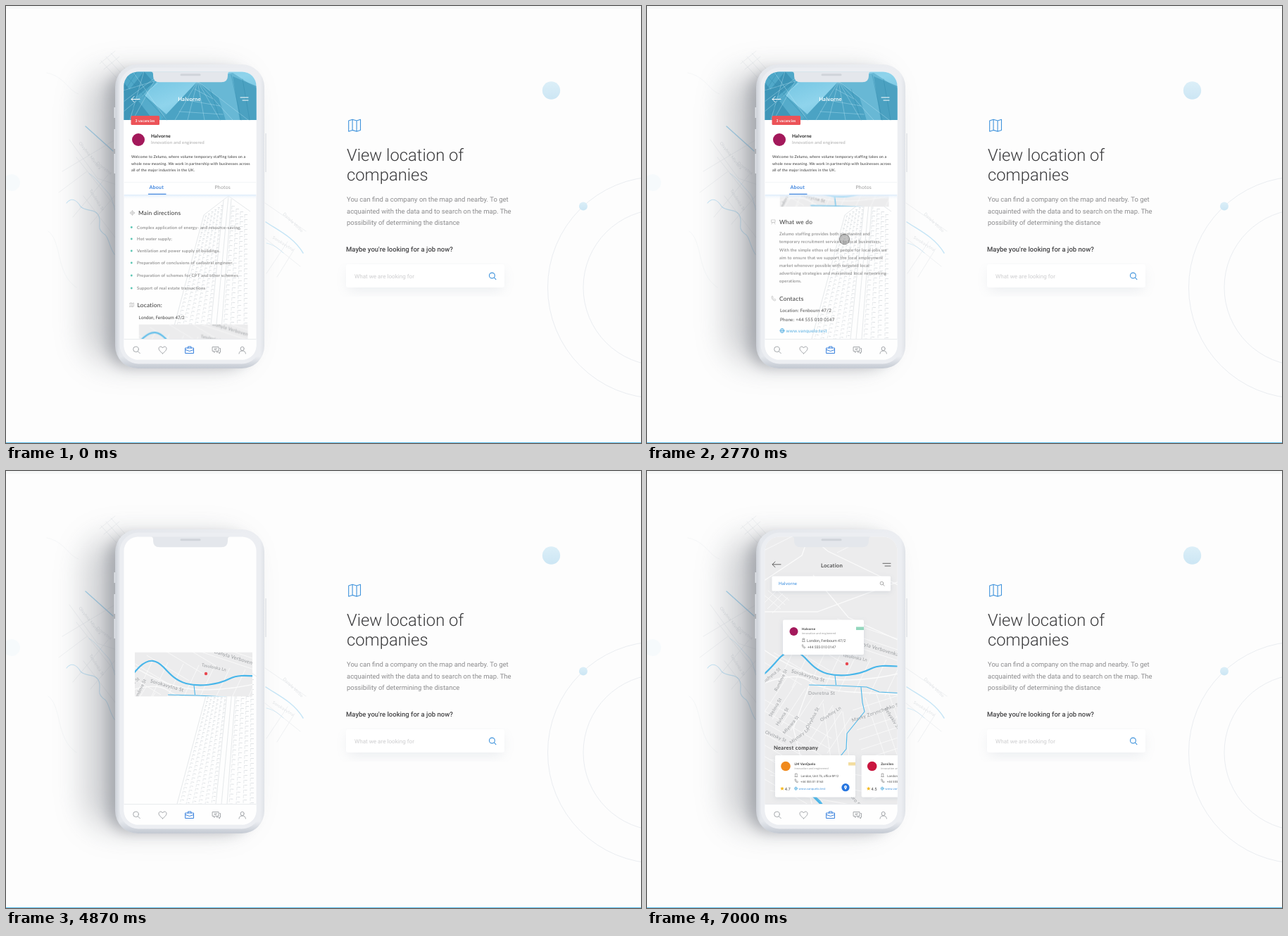
An HTML page that plays this animation: 902 by 621 pixels, repeating every 7060 ms.

```html
<!DOCTYPE html>
<html lang="en">
<head>
<meta charset="utf-8">
<title>View location of companies</title>
<style>
html, body { margin: 0; width: 100%; height: 100%; overflow: hidden; background: #fdfdfd; }
svg, #zoom { position: absolute; left: 0; top: 0; width: 902px; height: 621px; }
text { font-family: Lato, "Open Sans", sans-serif; letter-spacing: .03em; text-rendering: geometricPrecision; }
.r { font-family: Roboto, "Open Sans", sans-serif; letter-spacing: 0; }
.b { font-weight: 700; }
.h { font-size: 8.35px; fill: #333; }
.p { font-size: 6.05px; fill: #777; }
.s { font-size: 6.3px; fill: #444; }
.mini { font-size: 3.9px; fill: #999; }
.line { fill: none; stroke-linecap: round; stroke-linejoin: round; }
.road { fill: none; stroke: #fbfbfb; }
.water { fill: none; stroke: #48b6ea; stroke-linejoin: round; }

#scroll, #mini, #page, #tower, #zoom, #map2, #bar, #tip, #near, #cards, #dot {
  animation: 7060ms linear infinite both;
}
#scroll { animation-name: scroll; }
#mini { animation-name: mini; }
#page { animation-name: page; }
#tower { animation-name: tower; }
#zoom { animation-name: zoom; }
#map2 { animation-name: map2; }
#bar { animation-name: bar; }
#tip { animation-name: tip; }
#near { animation-name: near; }
#cards { animation-name: cards; }
#dot { animation-name: dot; }

@keyframes scroll {
  0%, 32% { transform: translateY(0); animation-timing-function: cubic-bezier(.45,0,.25,1); }
  44.9%, 48% { transform: translateY(-277px); animation-timing-function: cubic-bezier(.45,0,.25,1); }
  57.5%, 100% { transform: translateY(-140.5px); }
}
@keyframes mini { 0%, 62.32% { opacity: 1; } 62.33%, 100% { opacity: 0; } }
@keyframes page {
  0%, 62.2% { opacity: 1; animation-timing-function: ease-in-out; }
  67%, 100% { opacity: 0; }
}
@keyframes tower {
  0%, 62.2% { transform: translateX(-9px); animation-timing-function: ease-in-out; }
  68.9%, 100% { transform: none; }
}
@keyframes zoom {
  0%, 62.31% { visibility: hidden; clip-path: inset(312.5px 558.5px 251px 188.5px round 0px 0px 0px 0px); }
  62.32% { visibility: visible; clip-path: inset(312.5px 558.5px 251px 188.5px round 0px 0px 0px 0px); animation-timing-function: ease-in-out; }
  68.9% { visibility: visible; clip-path: inset(258px 552px 301px 183px round 0px 0px 0px 0px); animation-timing-function: cubic-bezier(.4,0,.2,1); }
  72.8%, 100% { visibility: visible; clip-path: inset(93.5px 546.5px 148px 167.5px round 20px 20px 0px 0px); }
}
@keyframes map2 {
  0%, 62.32% { transform: translate(18.7px,86.1px) scale(.928); animation-timing-function: ease-in-out; }
  68.9% { transform: translate(0,14px) scale(1); animation-timing-function: cubic-bezier(.4,0,.2,1); }
  72.8%, 100% { transform: translate(0,0) scale(1); }
}
@keyframes bar { 0%, 73.1% { opacity: 0; transform: translateY(-5px); animation-timing-function: ease-out; } 77.3%, 100% { opacity: 1; transform: none; } }
@keyframes tip { 0%, 74.4% { opacity: 0; transform: translateY(8px); animation-timing-function: ease-out; } 79%, 100% { opacity: 1; transform: none; } }
@keyframes near { 0%, 73.6% { opacity: 0; animation-timing-function: ease-out; } 78%, 100% { opacity: 1; } }
@keyframes cards {
  0%, 73.1% { transform: translateX(190px); animation-timing-function: cubic-bezier(.25,.5,.4,1); }
  80.3% { transform: translateX(-15.4px); animation-timing-function: cubic-bezier(.35,0,.2,1); }
  99.1%, 100% { transform: none; }
}
@keyframes dot {
  0%, 14% { opacity: 0; transform: translate(330px,272px); animation-timing-function: linear; }
  14.9% { opacity: 1; transform: translate(327px,279px); animation-timing-function: ease-out; }
  19.8%, 22.5% { opacity: 1; transform: translate(284.5px,369.5px); animation-timing-function: ease-in-out; }
  26% { opacity: 1; transform: translate(276px,364px) scale(.9); animation-timing-function: ease-in-out; }
  29.7%, 32.1% { opacity: 1; transform: translate(280.5px,359px) scale(.79); animation-timing-function: cubic-bezier(.45,0,.25,1); }
  44.9%, 48% { opacity: 1; transform: translate(280.5px,325px) scale(.79); animation-timing-function: ease-in-out; }
  57.5%, 62.2% { opacity: 1; transform: translate(281px,337px); animation-timing-function: ease-out; }
  64.8%, 100% { opacity: 0; transform: translate(281px,337px) scale(1.3); }
}
</style>
</head>
<body>

<!-- stage and phone -->
<svg viewBox="0 0 902 621">
  <defs>
    <filter id="blur" x="-50%" y="-30%" width="200%" height="160%"><feGaussianBlur stdDeviation="22"/></filter>
    <filter id="blurS" x="-30%" y="-30%" width="160%" height="160%"><feGaussianBlur stdDeviation="9"/></filter>
    <filter id="drop" x="-20%" y="-40%" width="140%" height="200%"><feDropShadow dx="0" dy="2" stdDeviation="3" flood-color="#8795a8" flood-opacity=".22"/></filter>
    <linearGradient id="ball" x2="0" y2="1"><stop stop-color="#dceff8"/><stop offset="1" stop-color="#cce6f4"/></linearGradient>
    <linearGradient id="body"><stop stop-color="#cdd1d8"/><stop offset=".03" stop-color="#e4e7ec"/><stop offset=".97" stop-color="#eceef2"/><stop offset="1" stop-color="#e0e3e8"/></linearGradient>
    <linearGradient id="foot" x2="0" y2="1"><stop offset=".96" stop-color="#b4bbc6" stop-opacity="0"/><stop offset="1" stop-color="#b4bbc6" stop-opacity=".7"/></linearGradient>
    <linearGradient id="sky" x2="1" y2="1"><stop stop-color="#66bddd"/><stop offset=".5" stop-color="#8fd4ec"/><stop offset="1" stop-color="#5cb5d6"/></linearGradient>
    <linearGradient id="tabs" x2="0" y2="1"><stop stop-color="#dcebfa"/><stop offset="1" stop-color="#fff" stop-opacity="0"/></linearGradient>
    <clipPath id="screen"><rect x="167.5" y="93.5" width="188" height="409" rx="20"/></clipPath>
    <clipPath id="list"><rect x="167.5" y="268" width="188" height="205"/></clipPath>
    <clipPath id="strip"><rect x="183" y="244" width="167" height="62"/></clipPath>
  </defs>
  <rect width="902" height="4" fill="#f6f7f7"/>
  <rect y="620" width="902" height="1" fill="#5fc0ee"/>

  <g class="line" stroke="#eff1f3">
    <path d="M135 78l22 24M142 72l22 24M149 67l20 22M133 82l22-18M139 90l22-18M90 190l40 55l30 10M80 235l75-45M100 215l55 70M75 265l40-30M110 270l46 60M95 300l50-60M120 310l34-40M368 280l58 40M368 330l50 40M370 380l30-45M385 385l25-40"/>
    <path d="M58 95c25 5 30 25 45 30M60 320c20 15 10 60 40 80" stroke="#f5f7f8"/>
  </g>
  <g class="line" stroke="#a9d9f3">
    <path d="M113 171l39 35" stroke-width="1.5"/>
    <g opacity=".65">
      <path d="M86 280c8-10 16-2 20 5c8 8 22 2 26 14c4 10-4 16 6 24c8 4 8 18 16 30" stroke-width="1.1"/>
      <path d="M118 238c10 6 18 18 26 26s8 20 11 26" stroke-width=".7"/>
      <path d="M369 307c18 12 40 22 53 44" stroke-width="1.5"/>
      <path d="M370 337c10 2 18 8 24 14" stroke-width=".7"/>
    </g>
  </g>
  <g fill="#dfe2e5" font-size="6">
    <text transform="translate(103 195) rotate(52)">Olvyhna Mlynara</text>
    <text transform="translate(128 224) rotate(38)">Dovretna</text>
    <text transform="translate(393 296) rotate(44)">Danyla Verbo</text>
    <text transform="translate(378 330) rotate(32)">Sorokavytna</text>
    <text transform="translate(118 262) rotate(58)">Tasulenka St</text>
  </g>

  <circle cx="8" cy="251" r="12" fill="#f6fafc"/>
  <g fill="none" stroke="#eaedf1">
    <circle cx="927" cy="400" r="157.5"/>
    <circle cx="931" cy="400" r="111"/>
  </g>
  <circle cx="774.5" cy="120" r="12.7" fill="url(#ball)"/>
  <circle cx="820" cy="284.5" r="6" fill="url(#ball)"/>

  <path class="line" stroke="#3f93dc" stroke-width="1.1" d="M486.7 163l5.4-1.8l6 1.8l5.4-1.8v15.2l-5.4 1.8l-6-1.8l-5.4 1.8zM492.1 161.2v15.2M498.1 163v15.2"/>
  <g fill="#39393b" font-size="23.8" font-weight="300">
    <text class="r" x="484" y="219.5">View location of</text>
    <text class="r" x="484" y="248.3">companies</text>
  </g>
  <g fill="#8b8b8d" font-size="9.48">
    <text class="r" x="484" y="278.2">You can find a company on the map and nearby. To get</text>
    <text class="r" x="484" y="294.7">acquainted with the data and to search on the map. The</text>
    <text class="r" x="484" y="311.2">possibility of determining the distance</text>
  </g>
  <text class="r" x="483" y="349" font-size="9.5" font-weight="500" fill="#454547">Maybe you're looking for a job now?</text>
  <rect x="486" y="374" width="219" height="30" rx="4" fill="#8795a8" opacity=".16" filter="url(#blurS)"/>
  <rect x="483" y="367" width="225" height="33" rx="3" fill="#fff"/>
  <text class="r" x="495" y="386.5" font-size="8.1" fill="#cdcdcf">What we are looking for</text>
  <path class="line" stroke="#3f93dc" stroke-width="1.1" d="M693.5 386l2.4 2.6M694.3 383a3.9 3.9 0 1 1-7.8 0a3.9 3.9 0 1 1 7.8 0"/>

  <rect x="112" y="94" width="230" height="414" rx="40" fill="#70757d" opacity=".34" filter="url(#blur)"/>
  <rect x="144" y="92" width="205" height="422" rx="32" fill="#666b74" opacity=".36" filter="url(#blurS)"/>
  <path d="M154.3 144v15M154.3 175v28M154.3 210v28" stroke="#dfe2e7" stroke-width="1.6"/>
  <path d="M369 181v55" stroke="#d3d7dd"/>
  <rect x="155" y="83" width="212" height="432" rx="32" fill="url(#body)"/>
  <rect x="155" y="83" width="212" height="432" rx="32" fill="url(#foot)"/>
  <rect x="161.5" y="87.5" width="200" height="421" rx="27" fill="#eceef2"/>
  <rect x="167.5" y="93.5" width="188" height="409" rx="20" fill="#fefefe"/>
  <g clip-path="url(#list)"><g id="tower" fill="none" stroke="#dfe2e5"></g></g>
</svg>

<!-- company page -->
<svg viewBox="0 0 902 621">
  <g id="page">
    <g clip-path="url(#list)">
      <g id="scroll">
        <g class="line" stroke="#bbb" stroke-width=".7">
          <circle cx="179.5" cy="294" r="2.5"/><path d="M179.5 290.6v6.8M176.1 294h6.8"/>
          <path d="M175.5 422.5l2-.6l2 .6l2-.6v5l-2 .6l-2-.6l-2 .6zM177.5 422v5M179.5 422.5v5"/>
          <path d="M177 529h5v3.5h-5zM177 535l1.5-2.5M182 535l-1.5-2.5"/>
          <path d="M177 638.5q0 5 5 5.5l1-1.5l-1.8-1.2l-1 .8q-1.2-.7-1.7-2l.8-.9l-1-1.7z"/>
          <path d="M177 712h4v6h-4zM178.5 714h4M178.5 716h4"/>
        </g>
        <text class="h" x="188" y="297">Main directions</text>
        <g id="items"></g>
        <text class="h" x="186.5" y="428">Location:</text>
        <text class="s r" x="188.5" y="445.2">London, Fenbourn 47/2</text>
        <g id="mini"><g transform="translate(18.7 226.6) scale(.928)"><g clip-path="url(#strip)"><use href="#map"/></g></g></g>
        <text class="h" x="188" y="535">What we do</text>
        <g id="about"></g>
        <text class="h" x="188" y="644.3">Contacts</text>
        <text class="s" x="189" y="660.3">Location: Fenbourn 47/2</text>
        <text class="s" x="189" y="672.7">Phone: +44 555 010 0147</text>
        <g class="line" stroke="#4aa9e0" stroke-width=".7"><circle cx="192" cy="686.5" r="3"/><ellipse cx="192" cy="686.5" rx="1.3" ry="3"/><path d="M189 686.5h6"/></g>
        <text x="197.5" y="688.7" font-size="6.5" fill="#4aa9e0">www.vanquelo.test</text>
        <text class="h" x="188" y="717.7">Other company vacancies</text>
        <rect x="179.5" y="733.8" width="6" height="4.8" rx=".6" fill="#f0a353"/>
        <text x="192.5" y="739" font-size="6.8" fill="#444">Sales Engineer</text>
        <text x="192.5" y="747" font-size="4.7" fill="#4aa9e0">norvetmalenika</text>
        <text class="r" x="336.5" y="738" font-size="6.4" font-weight="500" fill="#3b82dd" text-anchor="end">$18 / hr</text>
        <text x="336.5" y="747" font-size="4.3" fill="#aaa" text-anchor="end">Temporary</text>
      </g>
      <rect x="167.5" y="268" width="188" height="7" fill="url(#tabs)"/>
    </g>

    <g clip-path="url(#screen)">
      <rect x="167" y="162" width="189" height="106" fill="#fff"/>
      <rect x="167" y="93" width="189" height="69" fill="url(#sky)"/>
      <path d="M167 93h42l6 14l-18 20l40 35h-70z" fill="#459fc1" opacity=".75"/>
      <path d="M167 108l42 54h-42zM196 93l14 16l-43 34v-14z" fill="#2f86a9" opacity=".55"/>
      <path d="M272 107l32 22l8 33h-92z" fill="#4ba3c4"/>
      <path d="M272 107l50-12l34 22v45h-44l-10-32z" fill="#68b8d5"/>
      <path d="M322 100l34 14v48h-24z" fill="#3f97b9" opacity=".7"/>
      <path class="line" stroke="#c4ecf8" stroke-width=".6" opacity=".6" d="M272 107l32 55M272 107l10 55M272 107l-14 55M272 107l-32 55M272 107l50 55M272 107l72 55M167 120l66-20M167 136l50-38M180 93l48 69M196 93l-20 69M210 108l-30 54M167 150l48-40M268 118l26 14M258 134l46 8M246 150l62 4"/>
      <path class="line" stroke="#2f86a9" stroke-width=".7" opacity=".6" d="M170 98l58 64M186 93l-19 30M204 112l-28 40M290 118l14 44M320 98l14 64M336 104l10 58"/>
    </g>
    <path class="line" stroke="#fff" d="M190 132.5h-12l4-4M178 132.5l4 4M333 130h11M336 134h8"/>
    <text class="b" x="260.5" y="134.7" font-size="7.6" fill="#fff" text-anchor="middle">Halvorne</text>
    <rect x="177.5" y="156" width="40.5" height="13" rx="1.5" fill="#ec5358"/>
    <text class="b" x="197.5" y="164.5" font-size="5.2" fill="#fff" text-anchor="middle">3 vacancies</text>
    <circle cx="188" cy="190" r="9" fill="#a3195b"/>
    <text class="b" x="206" y="187.3" font-size="6.5" fill="#222">Halvorne</text>
    <text x="206" y="196.3" font-size="6.1" fill="#aaa">Innovation and engineered</text>
    <g font-size="5.35" fill="#333">
      <text x="178" y="216">Welcome to Zelumo, where volume temporary staffing takes on a</text>
      <text x="178" y="225.7">whole new meaning. We work in partnership with businesses across</text>
      <text x="178" y="235.3">all of the major industries in the UK.</text>
    </g>
    <path d="M168 250.5h187" stroke="#f3f5f7"/>
    <text class="b" x="203.5" y="259.7" font-size="7" fill="#3b82dd">About</text>
    <text x="296.5" y="259.7" font-size="6.95" fill="#999">Photos</text>
    <path d="M202 267.3h25.5" stroke="#3b82dd" stroke-width="1.2"/>
  </g>
</svg>

<!-- map that grows to fill the screen -->
<div id="zoom"><svg viewBox="0 0 902 621">
  <g id="map2"><g id="map">
    <rect x="160" y="80" width="205" height="400" fill="#ececed"/>
    <path class="road" id="roads" stroke-width=".8"/>
    <path class="road" stroke-width="1.3" d="M160 250q60 42 105 46t100-10M160 304q50-20 70-6t60 16t76 4M215 80l42 34l108 52M160 160l60-40l14-40M160 200l82 0l124-46M230 306l-22 60l28 114M356 240l-70-32l-50-60"/>
    <path class="water" stroke-width="2.2" d="M160 293C170 288 181 273 190 264C204 251 214 255 224 265C234 276 242 284 256 288C275 293 300 290 318 281C330 275 343 277 365 278"/>
    <path class="water" stroke-width="1.1" d="M267 290.5l1.5 13.5M230 304l42 1l40 2l18 7l36 2M304 307l2 22l3 13l-25 31l-1 22l-16 20l-24 10l-14 14M222 446l14 14l10 9l8 11"/>
    <path class="water" stroke-width="3" d="M232 458l18 18"/>
    <circle cx="284" cy="274" r="2.2" fill="#e8474f"/>
    <g id="streets" fill="#989b9e" text-anchor="middle"></g>
  </g></g>
</svg></div>

<!-- map interface, navigation, touch -->
<svg viewBox="0 0 902 621">
  <g id="bar">
    <path class="line" stroke="#555" stroke-width=".9" d="M190 132.8h-12l4-3.8M178 132.8l4 3.8M335 131.3h11M338 135h8"/>
    <text class="b" x="262.5" y="136.7" font-size="7.7" fill="#555" text-anchor="middle">Location</text>
    <rect x="177.5" y="149.5" width="168.5" height="21" rx="1.5" fill="#fff" filter="url(#drop)"/>
    <text x="187" y="162.2" font-size="6.2" fill="#2d86dc">Halvorne</text>
    <path class="line" stroke="#999" stroke-width=".8" d="M335.3 161.3l1.8 1.9M335.8 159.5a2.3 2.3 0 1 1-4.6 0a2.3 2.3 0 1 1 4.6 0"/>
  </g>
  <g id="tip">
    <rect x="193" y="211.5" width="115" height="49.5" rx="2" fill="#fff" filter="url(#drop)"/>
    <circle cx="208.5" cy="228" r="6" fill="#a3195b"/>
    <rect x="297" y="221.5" width="11" height="4.5" fill="#93d7bd"/>
    <text class="b" x="220" y="226.3" font-size="4.45" fill="#333">Halvorne</text>
    <text class="mini" x="220" y="231.5">innovation and engineered</text>
    <path class="line" stroke="#777" stroke-width=".6" d="M220.5 242.5h3.8M221 242v-4h2.8v4M221.8 239.5h1.2M220.3 247.5q.3 4 4 4.2l.7-1l-1.3-1l-.8.6l-1.1-1.3l.6-.8l-1-1.3z"/>
    <text class="r" x="227" y="242.5" font-size="5.35" fill="#555">London, Fenbourn 47/2</text>
    <text class="r" x="228" y="251.5" font-size="5" fill="#555">+44 555 010 0147</text>
  </g>
  <g clip-path="url(#screen)">
    <text id="near" class="b" x="180" y="396" font-size="7.7" fill="#444">Nearest company</text>
    <g id="cards"></g>
  </g>

  <g clip-path="url(#screen)"><rect x="167" y="473" width="189" height="30" fill="#fefefe"/></g>
  <path d="M167.5 473.5h188" stroke="#e9ebee"/>
  <g class="line" stroke="#9a9da2" stroke-width=".9">
    <path d="M187.3 490.7l3 3M188.3 487.8a3.8 3.8 0 1 1-7.6 0a3.8 3.8 0 1 1 7.6 0"/>
    <path d="M222.5 493.8c-3.2-2.6-5.5-4.6-5.5-7c0-3.2 4-3.8 5.5-.9c1.5-2.9 5.5-2.3 5.5.9c0 2.4-2.3 4.4-5.5 7z"/>
    <path stroke="#3b82dd" stroke-width="1" d="M255 486h11.5v7.5h-11.5zM258.5 486v-2h4.5v2M255 488.5l5.7 2l5.8-2"/>
    <path d="M293.5 484.5h8.5v6h-4.5l-2 2v-2h-2zM303.5 486.5h1v5.5h-1v2l-2-2h-2.5M296 486.8h3.5M296 488.5h2.5"/>
    <path d="M338.2 487a2.5 2.8 0 1 1-5 0a2.5 2.8 0 1 1 5 0M331 494q.4-4 4.7-4t4.7 4"/>
  </g>
  <path d="M206 93.3h112q-3 .5-3 4v2q0 9-9 9h-88q-9 0-9-9v-2q0-3.5-3-4z" fill="#e4e7ec"/>
  <rect x="247.5" y="96.3" width="29" height="3" rx="1.5" fill="#d0d4da"/>
  <circle id="dot" r="9" fill="#858585" fill-opacity=".5" stroke="#666" stroke-opacity=".7"/>
</svg>

<script>
const el = id => document.getElementById(id);

el('items').innerHTML = [
  ['Complex application of energy- and resource-saving,', 314.5],
  ['Hot water supply;', 331],
  ['Ventilation and power supply of buildings.', 348],
  ['Preparation of conclusions of cadastral engineer.', 365],
  ['Preparation of schemes for CPT and other schemes', 383],
  ['Support of real estate transactions', 401]
].map(([t, y]) => `<circle cx="178.3" cy="${y}" r="1.4" fill="#5cc6b4"/><text class="p" x="186" y="${y + 2.2}">${t}</text>`).join('');

el('about').innerHTML = [
  'Zelumo staffing provides both permanent and',
  'temporary recruitment services to local businesses.',
  'With the simple ethos of local people for local jobs we',
  'aim to ensure that we support the local employment',
  'market whenever possible with targeted local',
  'advertising strategies and maximised local networking',
  'operations.'
].map((t, i) => `<text class="p" x="188" y="${551.1 + i * 11.2}">${t}</text>`).join('');

// Tower: dashed columns that spread towards the ground
let cols = '<path d="M325 270L290 297L243 473M325 270L306 473M325 270L356 292M318 276L298 473M329 274L314 473" stroke-width=".8"/>';
const column = (x1, y1, x2, w, dash) =>
  `<path d="M${x1} ${y1}L${x2} 473" stroke-width="${w}" stroke-dasharray="${dash}"/>`;
for (let i = 0; i < 6; i++) {
  cols += column(293 + i * 4.6, 298 - i * 3, 250 + i * 9, 3, '1 5');
  cols += column(293 + i * 4.6, 298 - i * 3, 247 + i * 9, .7, '4 2');
}
for (let i = 0; i < 4; i++) {
  cols += column(332 + i * 6, 284 + i * 4, 320 + i * 10, 4, '1 6');
  cols += column(330 + i * 6, 284 + i * 4, 317 + i * 10, .7, '5 2');
}
el('tower').innerHTML = cols;

// Roads: groups of parallel streets
const hatch = (x, y, dx, dy, sx, sy, n) =>
  Array.from({length: n}, (_, i) => `M${x + sx * i} ${y + sy * i}l${dx} ${dy}`).join('');
el('roads').setAttribute('d',
  hatch(165, 345, 34, -52, 13, 8, 8) + hatch(162, 322, 100, 58, -2, 15, 8) +
  hatch(292, 340, 74, -24, 3, 14, 10) + hatch(310, 322, 44, 130, 16, -5, 5) +
  hatch(164, 190, 22, -22, 7, 6, 3) + hatch(166, 176, 24, 20, 6, -6, 3) +
  hatch(160, 268, 60, 36, 20, -10, 5) + hatch(184, 306, 24, -50, 22, 2, 8) +
  hatch(262, 238, 96, 32, 4, -14, 3) + hatch(250, 330, 14, 100, 14, 6, 3) +
  hatch(175, 410, 170, 30, 0, 22, 3) + hatch(160, 116, 60, -30, 110, 0, 2));

el('streets').innerHTML = [
  ['Sorokavytna St', 228, 293, 16, 7],
  ['Danyla Verbovenka', 326, 254, 17, 7.2],
  ['Tasulenka Ln', 295, 267, 12, 6],
  ['Dovretna St', 248, 318, 0, 6.8],
  ['Mavky Zorynchenko St', 326, 345, -19, 6.8],
  ['Trelyakiv St', 346, 352, 58, 6.8],
  ['Olvyhna St', 237, 352, -62, 6.6],
  ['Olvyhny Ln', 262, 347, -33, 6.4],
  ['Mlynara St', 206, 362, -50, 6.4],
  ['Stelova St', 184, 337, -60, 6.4],
  ['Hulvna St', 194, 350, -58, 6.4],
  ['Rundova St', 192, 298, -64, 6.4],
  ['Temshyna St', 176, 294, -40, 6.4],
  ['Olvitsky St', 182, 379, 24, 6.4],
  ['Mlynary Ln', 218, 378, -38, 6.4],
  ['Lumvoro St', 290, 464, 52, 6.8]
].map(([t, x, y, a, s]) => `<text transform="translate(${x} ${y}) rotate(${a})" font-size="${s}">${t}</text>`).join('');

const card = (x, color, tag, name, place, phone, rate, site) => `<g transform="translate(${x} 404)">
  <rect width="114" height="59.5" rx="2" fill="#fff" filter="url(#drop)"/>
  <circle cx="15" cy="15.5" r="6.8" fill="${color}"/>
  <rect x="104" y="10" width="10" height="4.5" fill="${tag}"/>
  <text class="b" x="27.5" y="14.3" font-size="4.65" fill="#333">${name}</text>
  <text class="mini" x="27.5" y="19.5">innovation and engineered</text>
  <path class="line" stroke="#777" stroke-width=".6" d="M28 30.5h3.6M28.5 30v-4h2.6v4M28 34.5q.3 4 4 4.2l.6-1l-1.3-1l-.8.6l-1-1.3l.6-.8l-1-1.3z"/>
  <text class="r" x="36.5" y="30.5" font-size="4.4" fill="#555">${place}</text>
  <text class="r" x="36" y="38.8" font-size="4.35" fill="#555">${phone}</text>
  <path fill="#f6b91f" d="M10 44.5l.8 1.8l2 .2l-1.5 1.3l.5 2l-1.8-1l-1.8 1l.5-2l-1.5-1.3l2-.2z"/>
  <text class="r" x="13.8" y="49.5" font-size="5.8" fill="#444">${rate}</text>
  <g class="line" stroke="#4aa9e0" stroke-width=".6"><circle cx="29.5" cy="47.2" r="2"/><path d="M27.5 47.2h4M29.5 45.2v4"/></g>
  <text x="33.5" y="48.7" font-size="4.25" fill="#3b8fdd">${site}</text>
  <circle cx="100" cy="45.7" r="5.6" fill="#2776e0"/>
  <path fill="#fff" d="M100 49l-1.7-3a2 2 0 1 1 3.4 0z"/><circle cx="100" cy="45" r=".7" fill="#2776e0"/>
</g>`;
el('cards').innerHTML =
  card(182, '#f08a1d', '#f3dda0', 'LM VanQuelo', 'London, Unit 7b, office №12', '+44 555 01 0163', '4.7', 'www.vanquelo.test') +
  card(304.7, '#c9163f', '#93d7bd', 'Zorvilen', 'London, Fenbourn 12', '+44 555 010 0189', '4.5', 'www.zorvilen.test');
</script>
</body>
</html>
```
